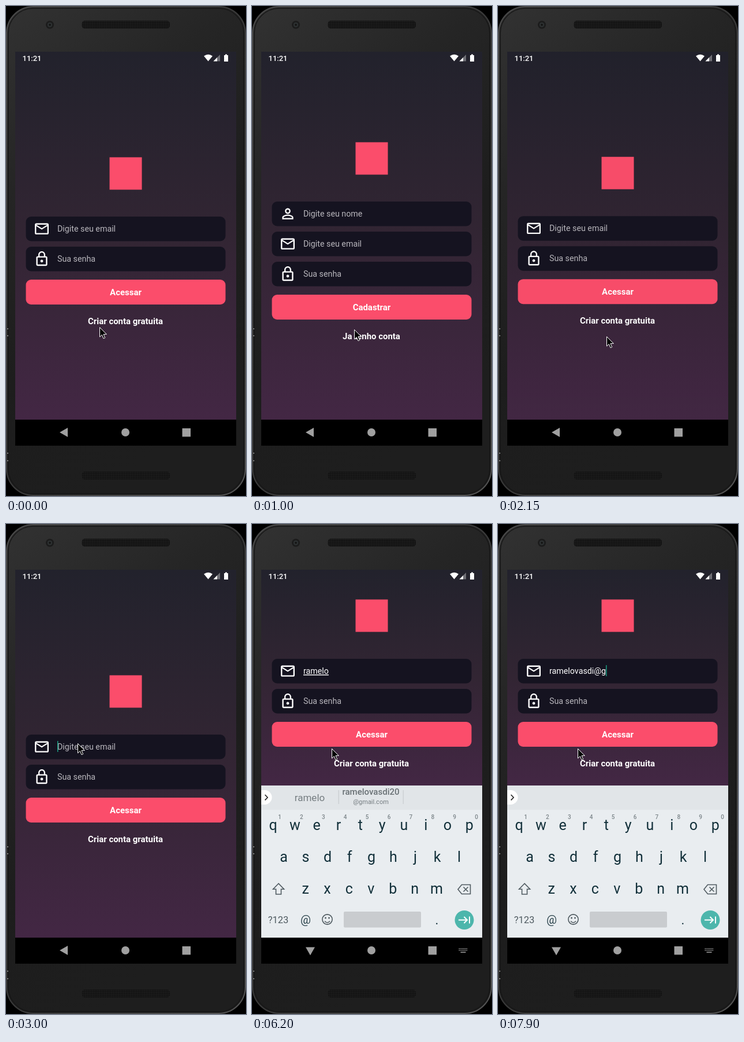
Recreate the animation shown at these times as an HTML page. Size 416 by 847 pixels, loop 8000 ms.

```html
<!DOCTYPE html>
<html lang="pt-BR">
<head>
<meta charset="utf-8">
<title>Login</title>
<style>
html, body { margin: 0; width: 100%; height: 100%; overflow: hidden; background: #000; }
svg { display: block; width: 416px; height: 847px; font-family: Roboto, sans-serif; }
.mid { text-anchor: middle; }
.bold { font-weight: 700; font-size: 14.95px; fill: #fff; text-anchor: middle; }
.field { font-size: 14.25px; }
.key { font-size: 25px; fill: #12303a; text-anchor: middle; }
.hint { font-size: 10px; fill: #7d868a; text-anchor: middle; font-weight: 500; }
</style>
</head>
<body>
<svg id="stage" viewBox="0 0 416 847" xmlns="http://www.w3.org/2000/svg"></svg>
<script>
const LOOP = 8000, STEP = 50, TOP = 79, H = 636;
const PINK = '#fb4d6b', KEYS_UP = 5050, KEYS_SHOWN = 5100;
const USER = 'ramelovasdi';

const ICON = {
  mail: 'M20 4H4c-1.1 0-1.99.9-1.99 2L2 18c0 1.1.9 2 2 2h16c1.1 0 2-.9 2-2V6c0-1.1-.9-2-2-2zm0 14H4V8l8 5 8-5v10zm-8-7L4 6h16l-8 5z',
  lock: 'M12 17c1.1 0 2-.9 2-2s-.9-2-2-2-2 .9-2 2 .9 2 2 2zm6-9h-1V6c0-2.76-2.24-5-5-5S7 3.24 7 6v2H6c-1.1 0-2 .9-2 2v10c0 1.1.9 2 2 2h12c1.1 0 2-.9 2-2V10c0-1.1-.9-2-2-2zM8.9 6c0-1.71 1.39-3.1 3.1-3.1s3.1 1.39 3.1 3.1v2H8.9V6zM18 20H6V10h12v10z',
  person: 'M12 5.9c1.16 0 2.1.94 2.1 2.1s-.94 2.1-2.1 2.1S9.9 9.16 9.9 8s.94-2.1 2.1-2.1m0 9c2.97 0 6.1 1.46 6.1 2.1v1.1H5.9V17c0-.64 3.13-2.1 6.1-2.1M12 4C9.79 4 8 5.79 8 8s1.79 4 4 4 4-1.79 4-4-1.79-4-4-4zm0 9c-2.67 0-8 1.34-8 4v3h16v-3c0-2.66-5.33-4-8-4z'
};

const rect = (x, y, w, h, fill, more = '') =>
  `<rect x="${x}" y="${y}" width="${w}" height="${h}" fill="${fill}" ${more}/>`;
const text = (x, y, s, more = '') => `<text x="${x}" y="${y}" ${more}>${s}</text>`;

function field(y, icon, label, id) {
  return rect(34.5, y, 346, 42.5, '#151320', 'rx="9"') +
    `<path d="${ICON[icon]}" fill="#fff" transform="translate(47.6 ${y + 6.8}) scale(1.2)"/>` +
    text(89, y + 26.2, label, `id="${id}" class="field" fill="#b9b7bd"`);
}

function form(id, top, fields, button, link) {
  const by = top + fields.length * 52 + 5;
  return `<g id="${id}Form">` +
    rect(179.5, top - 102.5, 56, 56, PINK) +
    fields.map((f, i) => field(top + i * 52, f[0], f[1], id + i)).join('') +
    rect(34.5, by, 346, 43, PINK, 'rx="9"') +
    text(207.5, by + 27, button, 'class="bold"') +
    text(207, by + 77, link, `id="${id}Link" class="bold"`) + '</g>';
}

function row(letters, x, y, step) {
  return [...letters].map((c, i) => text(x + i * step, y, c, 'class="key letter"')).join('');
}

function keyboard() {
  const hints = [...'1234567890'].map((c, i) => text(48 + i * 37.9, 510, c, 'class="hint"')).join('');
  return '<g id="keys">' +
    rect(16, 452, 383, 263, '#e9edf0') + rect(16, 452, 383, 42, '#e1e5e8') +
    '<path d="M16 460h6a12.5 12.5 0 0 1 0 25h-6z" fill="#fff"/>' +
    '<path d="M22.5 468l4.5 4.7-4.5 4.7" fill="none" stroke="#222" stroke-width="1.6"/>' +
    '<g id="strip" class="mid">' +
    rect(149.7, 460, 1, 24, '#c3c8cb') + rect(261.7, 460, 1, 24, '#c3c8cb') +
    text(100, 479, '', 'id="typed" font-size="17" fill="#757d81"') +
    text(206, 468, USER + '20', 'font-size="15" font-weight="500" fill="#687074"') +
    text(206, 484, '@gmail.com', 'font-size="11" fill="#757d81"') + '</g>' +
    row('qwertyuiop', 36.6, 528.5, 37.8) + hints +
    row('asdfghjkl', 55, 583.5, 38) + row('zxcvbnm', 92.6, 638.5, 37.9) +
    '<g fill="none" stroke="#4f5a60" stroke-width="1.6">' +
    '<path d="M46 621.5l-9.5 9.8h5v8.7h9v-8.7h5z"/>' +
    '<path d="M363.5 623.5h15v16h-15l-6.500-8zM366.500 627.500l8 8m0-8l-8 8"/>' +
    '<circle cx="130.500" cy="683.500" r="8.600"/><path d="M126 686.500q4.500 5 9 0"/></g>' +
    '<g fill="#4f5a60"><circle cx="127.500" cy="681" r="1.400"/><circle cx="133.500" cy="681" r="1.400"/></g>' +
    text(45.5, 690, '?123', 'class="mid" font-size="16.500" fill="#4f5a60"') +
    text(93, 691, '@', 'class="mid" font-size="20" fill="#2c444d"') +
    rect(159, 670, 134, 27.5, '#c9cccf', 'rx="2"') +
    text(320.5, 692, '.', 'class="mid" font-size="22" fill="#12303a"') +
    '<circle cx="368" cy="684.500" r="16.500" fill="#4db6ac"/>' +
    '<path d="M358 684.500h15m-5.500-5.500l5.500 5.500-5.500 5.500M377 678.500v12" fill="none" stroke="#fff" stroke-width="2"/></g>';
}

function speaker(y) {
  return rect(131.5, y, 152.5, 13.5, '#1d1d1d', 'rx="5"') + rect(131.5, y, 152.5, 13.5, 'url(#mesh)', 'rx="5"');
}

function phone() {
  return rect(0, 0, 416, 847, '#000') +
    rect(1, 1, 414, 845, 'url(#body)', 'rx="46" stroke="url(#rim)" stroke-width="2"') +
    rect(4, 4, 408, 839, 'none', 'rx="43" stroke="#171717" stroke-width="1.500"') +
    speaker(25.5) + speaker(805) +
    '<circle cx="76" cy="32.500" r="7" fill="#1c1c1c"/><circle cx="76" cy="32.500" r="4" fill="#2e3233"/><circle cx="76" cy="32.500" r="2" fill="#151515"/>' +
    [557, 569, 772, 785].map(y => rect(2.5, y, 1, 2, '#ddd')).join('');
}

function statusBar() {
  return text(28.5, 95, '11:21', 'font-size="13" font-weight="500" fill="#fff"') +
    '<path d="M350.500 95.500l-7.500-9q7.500-5.500 15 0z" fill="#fff"/>' +
    '<path d="M371 84v11.500h-11.500z" fill="#fff" opacity=".35"/><path d="M366 89v6.500h-6.500z" fill="#fff"/>' +
    '<path d="M380 83.500h3v1.500h2v11h-7v-11h2z" fill="#fff"/>';
}

function navBar() {
  const dots = [...Array(14)].map((_, i) => rect(358.5 + (i % 7) * 2.2, 733.5 + (i / 7 | 0) * 2.8, 1.4, 1.5, '#999')).join('');
  return rect(16, 715, 383, 45, '#000') + '<path id="back" fill="#a0a0a0"/>' +
    '<circle cx="207" cy="737" r="7" fill="#a0a0a0"/>' + rect(305.5, 730, 14.5, 14.5, '#a0a0a0') +
    `<g id="kbIcon">${dots}${rect(361.5, 739.5, 9, 1.6, '#999')}</g>`;
}

const grad = (id, stops, dir) => `<linearGradient id="${id}" ${dir}>` +
  stops.map((c, i) => `<stop offset="${i / (stops.length - 1)}" stop-color="${c}"/>`).join('') + '</linearGradient>';
const DOWN = 'x1="0" y1="0" x2="0" y2="1"';

document.getElementById('stage').innerHTML = '<defs>' +
  grad('bg', ['#22222c', '#322533', '#432744'], DOWN) +
  grad('body', ['#323232', '#252525', '#1d1d1d', '#1e1e1e'], 'x1="0" y1="0" x2=".4" y2="1"') +
  grad('rim', ['#4a4a4a', '#3a3a3a', '#555'], 'x1="0" y1="0" x2="1" y2="1"') +
  '<pattern id="mesh" width="3" height="3" patternUnits="userSpaceOnUse"><circle cx="1.500" cy="1.500" r="1" fill="#080808"/></pattern>' +
  `<clipPath id="screen">${rect(16, TOP, 383, H, '#000')}</clipPath>` +
  `<clipPath id="reveal">${rect(16, TOP, 383, H, '#000', 'id="revealBox"')}</clipPath></defs>` +
  phone() +
  `<g clip-path="url(#screen)">${rect(16, TOP, 383, H, '#fafafa', 'id="under"')}` +
  `<g id="login">${rect(16, TOP, 383, H, 'url(#bg)', 'id="loginBg"')}` +
  form('login', 364, [['mail', 'Digite seu email'], ['lock', 'Sua senha']], 'Acessar', 'Criar conta gratuita') +
  rect(89, 244, 1.4, 19, '#1ba78a', 'id="caret"') + '</g>' +
  rect(16, TOP, 383, H, '#000', 'id="shade"') +
  `<g clip-path="url(#reveal)"><g id="signup">${rect(16, TOP, 383, H, 'url(#bg)')}` +
  form('signup', 338, [['person', 'Digite seu nome'], ['mail', 'Digite seu email'], ['lock', 'Sua senha']], 'Cadastrar', 'Ja tenho conta') +
  `</g></g>${keyboard()}</g>` + statusBar() + navBar() +
  '<path id="mouse" d="M0 0v16.500l3.800-3.600 2.700 6.400 2.700-1.200-2.700-6.200h5.300z" fill="#000" stroke="#fff" stroke-width="1"/>';

const $ = id => document.getElementById(id);
const set = (id, props) => { for (const k in props) $(id).setAttribute(k, props[k]); };
const show = (id, on) => set(id, { visibility: on ? 'visible' : 'hidden' });
const clamp = v => Math.max(0, Math.min(1, v));
const letters = [...document.querySelectorAll('.letter')];

// cubic-bezier(.20833, .82, .25, 1)
function ease(x) {
  if (x <= 0 || x >= 1) return clamp(x);
  const at = (s, a, b) => 3 * (1 - s) ** 2 * s * a + 3 * (1 - s) * s * s * b + s ** 3;
  let lo = 0, hi = 1;
  for (let i = 0; i < 24; i++) {
    const m = (lo + hi) / 2;
    if (at(m, 0.20833, 0.25) < x) lo = m; else hi = m;
  }
  return at(lo, 0.82, 1);
}

const PATH = [
  [0, 162, 555], [450, 162, 555], [850, 177, 559], [1000, 177, 559], [1300, 196, 625],
  [1700, 188, 571], [2300, 188, 571], [2650, 121, 430], [2750, 121, 430], [3000, 124, 379],
  [5250, 124, 379], [5750, 138, 388], [LOOP, 138, 388]
];
function mouseAt(t) {
  const i = PATH.findIndex(p => p[0] > t), [t0, x0, y0] = PATH[i - 1], [t1, x1, y1] = PATH[i];
  const u = (t - t0) / (t1 - t0), k = u * u * (3 - 2 * u);
  return [x0 + (x1 - x0) * k, y0 + (y1 - y0) * k];
}

const TYPED = [5250, 5350, 5400, 5500, 5600, 5700, 6500, 6600, 6700, 7150, 7300, 7700, 7900];
const press = (t, at) => t < at || t > at + 250 ? 1 : 1 - 0.7 * clamp((t - at + 50) / 100) * clamp((at + 250 - t) / 150);

function draw(t) {
  const up = t >= KEYS_UP, keys = t >= KEYS_SHOWN;
  const p = t < 1900 ? ease((t - 150) / 425) : 1 - ease((t - 1940) / 425);
  const shift = up ? -131 : 0;

  show('signup', p > 0);
  set('revealBox', { y: TOP + H * (1 - p), height: H * p });
  set('signup', { transform: `translate(0 ${H * 0.041 * (1 - p)})` });
  set('login', { transform: `translate(0 ${-H * 0.02 * p})` });
  set('shade', { opacity: 0.1 * clamp(p / 0.36) });
  set('under', { fill: up ? '#fafafa' : '#432744' });
  set('loginBg', { height: up ? 373 : H });
  set('loginForm', { transform: `translate(0 ${shift})` });
  set('loginLink', { opacity: press(t, 50) });
  set('signupLink', { opacity: press(t, 1850) });

  const n = TYPED.filter(k => k <= t).length;
  const value = (USER + '@g').slice(0, n), email = $('login0');
  email.textContent = value || 'Digite seu email';
  email.setAttribute('fill', value ? '#fff' : '#b9b7bd');
  email.setAttribute('text-decoration', n && t < 7700 ? 'underline' : 'none');
  show('caret', t >= 2950 && !(t >= 6200 && t < 6500));
  set('caret', { x: 89 + (n ? email.getComputedTextLength() : 0), y: 375 + shift });

  show('keys', keys);
  show('kbIcon', up);
  show('strip', keys && n > 0 && t < 7700);
  $('typed').textContent = value;
  const caps = t >= 7650 && t < 7700;
  for (const k of letters) k.textContent = caps ? k.textContent.toUpperCase() : k.textContent.toLowerCase();
  set('back', { d: up ? 'M93 731.500h16l-8 14z' : 'M93 737l14-8v16z' });

  const [x, y] = mouseAt(t);
  set('mouse', { transform: `translate(${Math.round(x) + 0.5} ${Math.round(y) + 0.5})` });
}

const start = performance.now();
function tick() {
  const t = (performance.now() - start) % LOOP;
  draw(Math.floor(t / STEP) * STEP);
  requestAnimationFrame(tick);
}
tick();
</script>
</body>
</html>
```
